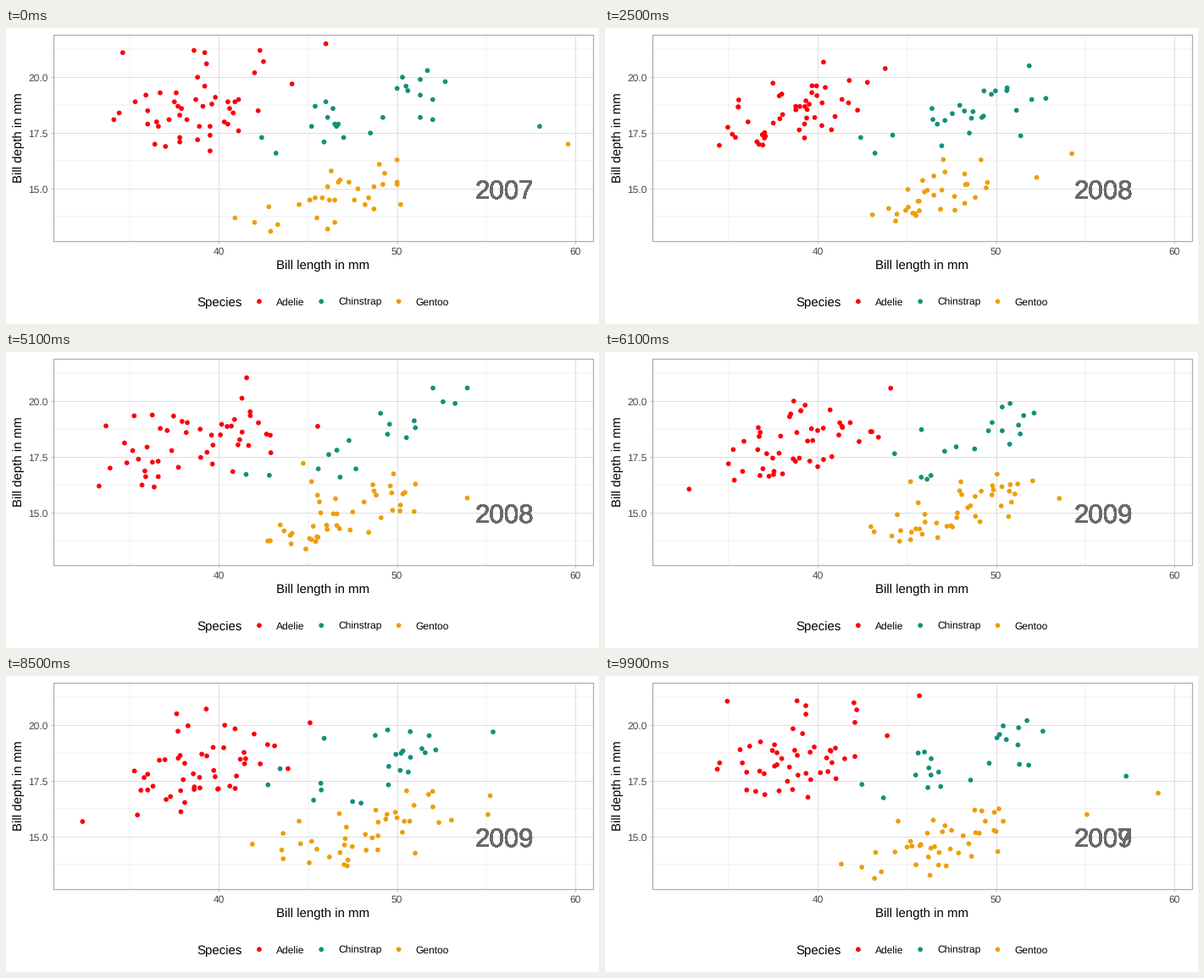
These frames come from a looping animation (700 by 350 pixels, 10 s). A matplotlib script:

```python
import numpy as np
import matplotlib.pyplot as plt
from matplotlib.animation import FuncAnimation
from matplotlib.patches import Rectangle

W, H, DPI = 700, 350, 100
PT = 72 / DPI  # points per pixel
LEFT, RIGHT, TOP, BOTTOM = 56.3, 692.5, 7.5, 251.5
X_MIN, X_MAX, Y_MIN, Y_MAX = 30.725, 60.975, 12.68, 21.92
RADIUS = 2.87
FRAMES, HOLD, SPANS = 100, 17, (17, 17, 16)
YEARS = ("2007", "2008", "2009")
COPIES = 40  # stacked year labels, which harden the glyph edges
BORDER, GRID, YEAR_GREY = "#acacac", "#d8d8d8", "#6a6a6a"

plt.rcParams["font.family"] = "Liberation Sans"
plt.rcParams["text.hinting"] = "none"
nan = np.nan


def px(x):
    return LEFT + (x - X_MIN) / (X_MAX - X_MIN) * (RIGHT - LEFT)


def py(y):
    return BOTTOM - (y - Y_MIN) / (Y_MAX - Y_MIN) * (BOTTOM - TOP)


def bills(length, depth):
    return np.column_stack([px(np.array(length)), py(np.array(depth))])


# Palmer penguins: bill length and depth in mm, by species and year
adelie_07 = bills(
    [39.1, 39.5, 40.3, nan, 36.7, 39.3, 38.9, 39.2, 34.1, 42.0, 37.8, 37.8, 41.1,
     38.6, 34.6, 36.6, 38.7, 42.5, 34.4, 46.0, 37.8, 37.7, 35.9, 38.2, 38.8, 35.3,
     40.6, 40.5, 37.9, 40.5, 39.5, 37.2, 39.5, 40.9, 36.4, 39.2, 38.8, 42.2, 37.6,
     39.8, 36.5, 40.8, 36.0, 44.1, 37.0, 39.6, 41.1, 37.5, 36.0, 42.3],
    [18.7, 17.4, 18.0, nan, 19.3, 20.6, 17.8, 19.6, 18.1, 20.2, 17.1, 17.3, 17.6,
     21.2, 21.1, 17.8, 19.0, 20.7, 18.4, 21.5, 18.3, 18.7, 19.2, 18.1, 17.2, 18.9,
     18.6, 17.9, 18.6, 18.9, 16.7, 18.1, 17.8, 18.9, 17.0, 21.1, 20.0, 18.5, 19.3,
     19.1, 18.0, 18.4, 18.5, 19.7, 16.9, 18.8, 19.0, 18.9, 17.9, 21.2])
adelie_08 = bills(
    [39.6, 40.1, 35.0, 42.0, 34.5, 41.4, 39.0, 40.6, 36.5, 37.6, 35.7, 41.3, 37.6,
     41.1, 36.4, 41.6, 35.5, 41.1, 35.9, 41.8, 33.5, 39.7, 39.6, 45.8, 35.5, 42.8,
     40.9, 37.2, 36.2, 42.1, 34.6, 42.9, 36.7, 35.1, 37.3, 41.3, 36.3, 36.9, 38.3,
     38.9, 35.7, 41.1, 34.0, 39.6, 36.2, 40.8, 38.1, 40.3, 33.1, 43.2],
    [17.7, 18.9, 17.9, 19.5, 18.1, 18.6, 17.5, 18.8, 16.6, 19.1, 16.9, 21.1, 17.0,
     18.2, 17.1, 18.0, 16.2, 19.1, 16.6, 19.4, 19.0, 18.4, 17.2, 18.9, 17.5, 18.5,
     16.8, 19.4, 16.1, 19.1, 17.2, 17.6, 18.8, 19.4, 17.8, 20.3, 19.5, 18.6, 19.2,
     18.8, 18.0, 18.1, 17.1, 18.1, 17.3, 18.9, 18.6, 18.5, 16.1, 18.5])
adelie_09 = bills(
    [35.0, 41.0, 37.7, 37.8, 37.9, 39.7, 38.6, 38.2, 38.1, 43.2, 38.1, 45.6, 39.7,
     42.2, 39.6, 42.7, 38.6, 37.3, 35.7, 41.1, 36.2, 37.7, 40.2, 41.4, 35.2, 40.6,
     38.8, 41.5, 39.0, 44.1, 38.5, 43.1, 36.8, 37.5, 38.1, 41.1, 35.6, 40.2, 37.0,
     39.7, 40.2, 40.6, 32.1, 40.7, 37.3, 39.0, 39.2, 36.6, 36.0, 37.8, 36.0, 41.5],
    [17.9, 20.0, 16.0, 20.0, 18.6, 18.9, 17.2, 20.0, 17.0, 19.0, 16.5, 20.3, 17.7,
     19.5, 20.7, 18.3, 17.0, 20.5, 17.0, 18.6, 17.2, 19.8, 17.0, 18.5, 15.9, 19.0,
     17.6, 18.3, 17.1, 18.0, 17.9, 19.2, 18.5, 18.5, 17.6, 17.5, 17.5, 20.1, 16.5,
     17.9, 17.1, 17.2, 15.5, 17.0, 16.8, 18.7, 18.6, 18.4, 17.8, 18.1, 17.1, 18.5])

chinstrap_07 = bills(
    [46.5, 50.0, 51.3, 45.4, 52.7, 45.2, 46.1, 51.3, 46.0, 51.3, 46.6, 51.7, 47.0,
     52.0, 45.9, 50.5, 50.3, 58.0, 46.4, 49.2, 42.4, 48.5, 43.2, 50.6, 46.7, 52.0],
    [17.9, 19.5, 19.2, 18.7, 19.8, 17.8, 18.2, 18.2, 18.9, 19.9, 17.8, 20.3, 17.3,
     18.1, 17.1, 19.6, 20.0, 17.8, 18.6, 18.2, 17.3, 17.5, 16.6, 19.4, 17.9, 19.0])
chinstrap_08 = bills(
    [50.5, 49.5, 46.4, 52.8, 40.9, 54.2, 42.5, 51.0, 49.7, 47.5, 47.6, 52.0, 46.9,
     53.5, 49.0, 46.2, 50.9, 45.5],
    [18.4, 19.0, 17.8, 20.0, 16.6, 20.8, 16.7, 18.8, 18.6, 16.8, 18.3, 20.7, 16.6,
     19.9, 19.5, 17.5, 19.1, 17.0])
chinstrap_09 = bills(
    [50.9, 50.8, 50.1, 49.0, 51.5, 49.8, 48.1, 51.4, 45.7, 50.7, 42.5, 52.2, 45.2,
     49.3, 50.2, 45.6, 51.9, 46.8, 45.7, 55.8, 43.5, 49.6, 50.8, 50.2],
    [17.9, 18.5, 17.9, 19.6, 18.7, 17.3, 16.4, 19.0, 17.3, 19.7, 17.3, 18.8, 16.6,
     19.9, 18.8, 19.4, 19.5, 16.5, 17.0, 19.8, 18.1, 18.2, 19.0, 18.7])

gentoo_07 = bills(
    [46.1, 50.0, 48.7, 50.0, 47.6, 46.5, 45.4, 46.7, 43.3, 46.8, 40.9, 49.0, 45.5,
     48.4, 45.8, 49.3, 42.0, 49.2, 46.2, 48.7, 50.2, 45.1, 46.5, 46.3, 42.9, 46.1,
     44.5, 47.8, 48.2, 50.0, 47.3, 42.8, 45.1, 59.6],
    [13.2, 16.3, 14.1, 15.2, 14.5, 13.5, 14.6, 15.3, 13.4, 15.4, 13.7, 16.1, 13.7,
     14.6, 14.6, 15.7, 13.5, 15.2, 14.5, 15.1, 14.3, 14.5, 14.5, 15.8, 13.1, 15.1,
     14.3, 15.0, 14.3, 15.3, 15.3, 14.2, 14.5, 17.0])
gentoo_08 = bills(
    [49.1, 48.4, 42.6, 44.4, 44.0, 48.7, 42.7, 49.6, 45.3, 49.6, 50.5, 43.6, 45.5,
     50.5, 44.9, 45.2, 46.6, 48.5, 45.1, 50.1, 46.5, 45.0, 43.8, 45.5, 43.2, 50.4,
     45.3, 46.2, 45.7, 54.3, 45.8, 49.8, 46.2, 49.5, 43.5, 50.7, 47.7, 46.4, 48.2,
     46.5, 46.4, 48.6, 47.5, 51.1, 45.2, 45.2],
    [14.8, 16.3, 13.7, 17.3, 13.6, 15.7, 13.7, 16.0, 13.7, 15.0, 15.9, 13.9, 13.9,
     15.9, 13.3, 15.8, 14.2, 14.1, 14.4, 15.0, 14.4, 15.4, 13.9, 15.0, 14.5, 15.3,
     13.8, 14.9, 13.9, 15.7, 14.2, 16.8, 14.4, 16.2, 14.2, 15.0, 15.0, 15.6, 15.6,
     14.8, 15.0, 16.0, 14.2, 16.3, 13.8, 16.4])
gentoo_09 = bills(
    [49.1, 52.5, 47.4, 50.0, 44.9, 50.8, 43.4, 51.3, 47.5, 52.1, 47.5, 52.2, 45.5,
     49.5, 44.5, 50.8, 49.4, 46.9, 48.4, 51.1, 48.5, 55.9, 47.2, 49.1, 47.3, 46.8,
     41.7, 53.4, 43.3, 48.1, 50.5, 49.8, 43.5, 51.5, 46.2, 55.1, 44.5, 48.8, 47.2,
     nan, 46.8, 50.4, 45.2, 49.9],
    [14.5, 15.6, 14.6, 15.9, 13.8, 17.3, 14.4, 14.2, 14.0, 17.0, 15.0, 17.1, 14.5,
     16.1, 14.7, 15.7, 15.8, 14.6, 14.4, 16.5, 15.0, 17.0, 15.5, 15.0, 13.8, 16.1,
     14.7, 15.8, 14.0, 15.1, 15.2, 15.9, 15.2, 16.3, 14.1, 16.0, 15.7, 16.2, 13.7,
     nan, 14.3, 15.7, 14.8, 16.1])

SPECIES = {
    "Adelie": ("#fb0007", (adelie_07, adelie_08, adelie_09)),
    "Chinstrap": ("#11907a", (chinstrap_07, chinstrap_08, chinstrap_09)),
    "Gentoo": ("#ee9e09", (gentoo_07, gentoo_08, gentoo_09)),
}
TOTALS = [sum(len(years[k]) for _, years in SPECIES.values()) for k in range(3)]

fig = plt.figure(figsize=(W / DPI, H / DPI), dpi=DPI, facecolor="white")
ax = fig.add_axes([0, 0, 1, 1])
ax.set_xlim(0, W)
ax.set_ylim(H, 0)
ax.axis("off")


def line(x0, y0, x1, y1, color, width, z):
    ax.plot([x0, x1], [y0, y1], color=color, lw=width * PT, zorder=z,
            solid_capstyle="butt")


def label(x, y, text, size, color="black", ha="left", **kw):
    return ax.text(x, y, text, fontsize=size * PT, color=color, ha=ha,
                   va="baseline", **kw)


def dots(xy, colors, z):
    return ax.scatter(xy[:, 0], xy[:, 1], s=(2 * RADIUS * PT) ** 2, c=colors,
                      linewidths=0, zorder=z)


def draw_panel():
    for x in (35, 45, 55):
        line(px(x), TOP, px(x), BOTTOM, GRID, 0.4, 1)
    for y in (13.75, 16.25, 18.75, 21.25):
        line(LEFT, py(y), RIGHT, py(y), GRID, 0.4, 1)
    for x in (40, 50, 60):
        line(px(x), TOP, px(x), BOTTOM, GRID, 0.8, 2)
        line(px(x), BOTTOM, px(x), BOTTOM + 3.75, BORDER, 0.75, 2)
        label(px(x), 268, str(x), 12, "#484848", "center")
    for y in (15.0, 17.5, 20.0):
        line(LEFT, py(y), RIGHT, py(y), GRID, 0.8, 2)
        line(LEFT - 3.75, py(y), LEFT, py(y), BORDER, 0.75, 2)
        label(LEFT - 6.9, py(y) + 4.3, f"{y:.1f}", 12, "#484848", "right")
    ax.add_patch(Rectangle((LEFT, TOP), RIGHT - LEFT, BOTTOM - TOP, fill=False,
                           ec=BORDER, lw=1.2 * PT, zorder=6))
    label((LEFT + RIGHT) / 2, 285, "Bill length in mm", 15, ha="center")
    ax.text(18.4, (TOP + BOTTOM) / 2, "Bill depth in mm", fontsize=15 * PT,
            rotation=90, rotation_mode="anchor", ha="center", va="baseline")


def draw_legend():
    label(225, 329, "Species", 15)
    keys = np.array([[298.9, 323.3], [372.2, 323.3], [463.6, 323.3]])
    dots(keys, [color for color, _ in SPECIES.values()], 4)
    for (x, _), name in zip(keys, SPECIES):
        label(x + 20, 328, name, 12)


def phase(frame):
    """Index of the current year and progress towards the next one."""
    start = 0
    for k, span in enumerate(SPANS):
        if frame < start + HOLD + span:
            return k, max(0, frame - start - HOLD + 1) / span
        start += HOLD + span


def blend(a, b, t):
    """Pair rows in order; unpaired rows leave or appear at the very end."""
    if t == 1:
        return b
    n = min(len(a), len(b))
    moved = a if t == 0 else np.vstack([a[:n] + (b[:n] - a[:n]) * t, a[n:]])
    return moved[np.isfinite(moved[:, 0])]


draw_panel()
draw_legend()
points = dots(np.zeros((3, 2)), [color for color, _ in SPECIES.values()], 4)
stamps = [label(px(56), py(15) + 11.2, "", 11 * 72.27 / 25.4, YEAR_GREY, "center",
                zorder=5) for _ in range(COPIES)]


def update(frame):
    k, t = phase(frame)
    nxt = (k + 1) % 3
    places, colors = [], []
    for color, years in SPECIES.values():
        xy = blend(years[k], years[nxt], t)
        places.append(xy)
        colors += [color] * len(xy)
    points.set_offsets(np.vstack(places))
    points.set_facecolors(colors)

    leaving = max(0, TOTALS[k] - TOTALS[nxt]) if t < 1 else 0
    for i, stamp in enumerate(stamps):
        stays = t < 0.5 or i >= COPIES - leaving
        stamp.set_text(YEARS[k if stays else nxt])
    return [points, *stamps]


anim = FuncAnimation(fig, update, frames=FRAMES, interval=100, repeat=True,
                     blit=False)
plt.show()
```
